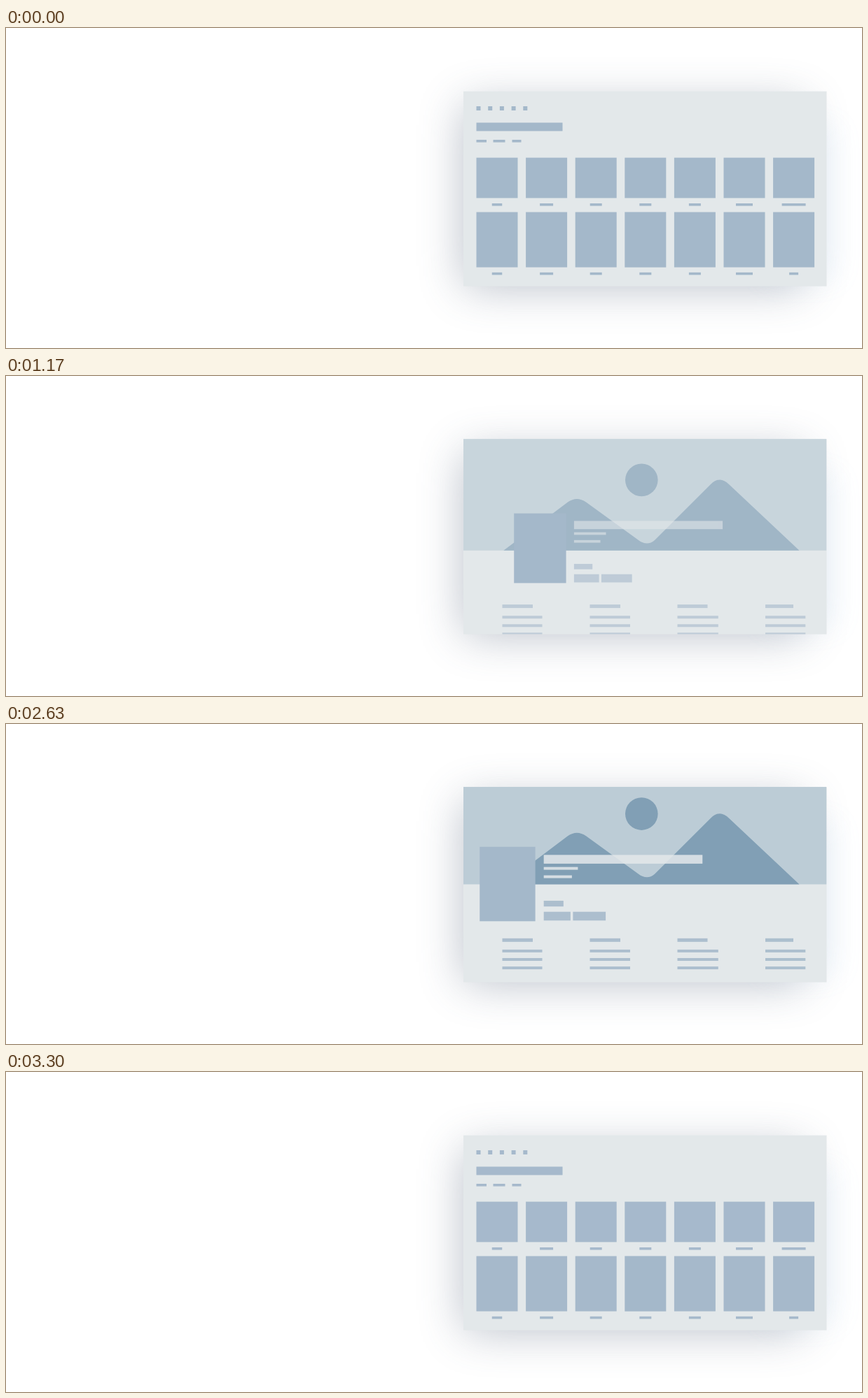
Animation, 1222 px wide and 458 px high, one loop 4130 ms. Source, as an HTML page:

```html
<!DOCTYPE html>
<html lang="en">
<head>
<meta charset="utf-8">
<title>Grid to detail transition</title>
<style>
  html, body { margin: 0; width: 100%; height: 100%; overflow: hidden; background: #fff; }
  svg { display: block; width: 100%; height: 100%; }
</style>
</head>
<body>
<svg viewBox="0 0 1222 458" xmlns="http://www.w3.org/2000/svg">
  <defs>
    <filter id="soft" filterUnits="userSpaceOnUse" x="500" y="-40" width="800" height="560" color-interpolation-filters="sRGB">
      <feGaussianBlur stdDeviation="32"/>
    </filter>
    <filter id="glow" filterUnits="userSpaceOnUse" x="900" y="0" width="400" height="458" color-interpolation-filters="sRGB">
      <feGaussianBlur stdDeviation="20"/>
    </filter>
    <clipPath id="frame"><rect x="653" y="90" width="518.5" height="279.6"/></clipPath>
  </defs>
  <rect x="653" y="109" width="486" height="262" fill="rgb(75,90,115)" opacity=".38" filter="url(#soft)"/>
  <rect x="1080" y="140" width="105" height="220" fill="rgb(150,200,245)" opacity=".1" filter="url(#glow)"/>
  <rect x="653" y="90.6" width="518.5" height="279" fill="#e3e8ea"/>
  <g clip-path="url(#frame)">
    <g id="grid" fill="#a4b8ca"></g>
    <g id="detail">
      <rect x="653" y="30" width="518.5" height="198.2" fill="#b6c8d3"/>
      <path fill="#7193ad" d="M710.3 228.2L802 159Q815 150 828 159L903 213.5C910 219 919 220 926 213.5L1006 133.5Q1019 120.5 1032 133.5L1132.5 228.2Z"/>
      <circle cx="907.3" cy="127.3" r="23.3" fill="#7193ad"/>
      <g id="lists" fill="#a4b8ca"></g>
    </g>
    <g id="hero">
      <rect width="79" height="106" fill="#a4b8ca"/>
      <g id="info"></g>
    </g>
    <circle id="pointer" cy="298.3" r="21.8" fill="#5b9bc4"/>
  </g>
</svg>
<script>
const LOOP = 4130;
const $ = id => document.getElementById(id);
const grid = $('grid'), detail = $('detail'), hero = $('hero'), info = $('info'), pointer = $('pointer');

function box(parent, x, y, w, h, fill) {
  const r = document.createElementNS('http://www.w3.org/2000/svg', 'rect');
  const attrs = { x, y, width: w, height: h };
  if (fill) attrs.fill = fill;
  for (const k in attrs) r.setAttribute(k, attrs[k]);
  parent.appendChild(r);
}

// Overview page
for (let i = 0; i < 5; i++) box(grid, 671.5 + i * 16.7, 112, 6, 6);
box(grid, 671.5, 135.5, 123, 12);
[[671.5, 14.5], [695.5, 17], [722.5, 13]].forEach(([x, w]) => box(grid, x, 160, w, 3.6));
[14.5, 19, 17, 17, 17, 24, 34].forEach((w, i) => {
  const x = 671.5 + i * 70.6, mid = x + 29.5, last = i === 6 ? 13 : w;
  box(grid, x, 185.6, 59, 57.8);
  box(grid, mid - w / 2, 251, w, 3.6);
  if (i !== 3) box(grid, x, 263.5, 59, 79);   // the fourth tile is the moving one
  box(grid, mid - last / 2, 349.8, last, 3.6);
});

// Detail page
[[708.5, 43.5, 57], [833.5, 43.5, 57.5], [958.5, 43, 58.3], [1084, 40, 57.3]].forEach(([x, head, row]) => {
  box($('lists'), x, 305.5, head, 5);
  for (let i = 0; i < 3; i++) box($('lists'), x, 321.6 + i * 12.1, row, 4);
});
box(info, 91, 11.5, 225.5, 12.5, '#e3e8ea');
box(info, 91, 28.7, 48.5, 4, '#e3e8ea');
box(info, 91, 40.6, 40, 4, '#e3e8ea');
box(info, 91, 76.8, 28, 8.2, '#a4b8ca');
box(info, 91, 92.5, 38, 12.5, '#a4b8ca');
box(info, 132.5, 92.5, 46.5, 12.5, '#a4b8ca');

// Easing
const span = (t, a, b) => Math.min(1, Math.max(0, (t - a) / (b - a)));
const mix = (a, b, p) => a + (b - a) * p;
const inOut = p => p < .5 ? 2 * p * p : 1 - 2 * (1 - p) * (1 - p);
const sineOut = p => Math.sin(p * Math.PI / 2);

function bezier(x1, y1, x2, y2) {
  const at = (s, a, b) => 3 * s * (1 - s) * (1 - s) * a + 3 * s * s * (1 - s) * b + s * s * s;
  return p => {
    if (p <= 0 || p >= 1) return p;
    let lo = 0, hi = 1;
    for (let i = 0; i < 30; i++) {
      const s = (lo + hi) / 2;
      if (at(s, x1, x2) < p) lo = s; else hi = s;
    }
    return at(lo, y1, y2);
  };
}
const ease = bezier(.25, .1, .25, 1);
const goMove = bezier(.4, 0, .24, 1), goSize = bezier(.4, 0, .2, 1);
const backMove = bezier(.2, .03, .05, 1), backSize = bezier(.2, -.18, .5, .95);

function place(el, dy, alpha) {
  el.setAttribute('transform', `translate(0 ${dy})`);
  el.setAttribute('opacity', alpha);
}

function draw(t) {
  const back = t >= 2600;

  const p = span(t, 120, 630);
  pointer.setAttribute('cx', mix(1028, 917, inOut(p)));
  pointer.setAttribute('opacity', .4 * span(p, 0, .25) * (1 - span(p, .57, 1.02)) * (p < 1));

  let move, size, pageY, pageA, gridY, gridA;
  if (back) {
    const b = span(t, 2600, 3300), out = span(t, 2600, 2750), into = sineOut(span(t, 2720, 3130));
    move = 1 - backMove(b);
    size = 1 - backSize(b);
    pageY = 30 * out * out;
    pageA = 1 - Math.pow(out, 1.25);
    gridY = -12 * (1 - into);
    gridA = .96 * into;
  } else {
    const g = span(t, 655, 1700), into = ease(span(t, 900, 1700)), out = inOut(span(t, 655, 900));
    move = goMove(g);
    size = goSize(g);
    pageY = 52 * (1 - into);
    pageA = into;
    gridY = -12 * out;
    gridA = 1 - out;
  }
  place(grid, gridY, gridA);
  place(detail, pageY, pageA);

  const k = mix(59 / 79, 1, size);
  const x = mix(912.8, 710.5, move) - 39.5 * k, y = mix(303, 227, move) - 53 * k;
  hero.setAttribute('transform', `translate(${x} ${y}) scale(${k})`);
  info.setAttribute('opacity', pageA);
}

const start = performance.now();
function tick() {
  draw((performance.now() - start) % LOOP);
  requestAnimationFrame(tick);
}
draw(0);
requestAnimationFrame(tick);
</script>
</body>
</html>
```
